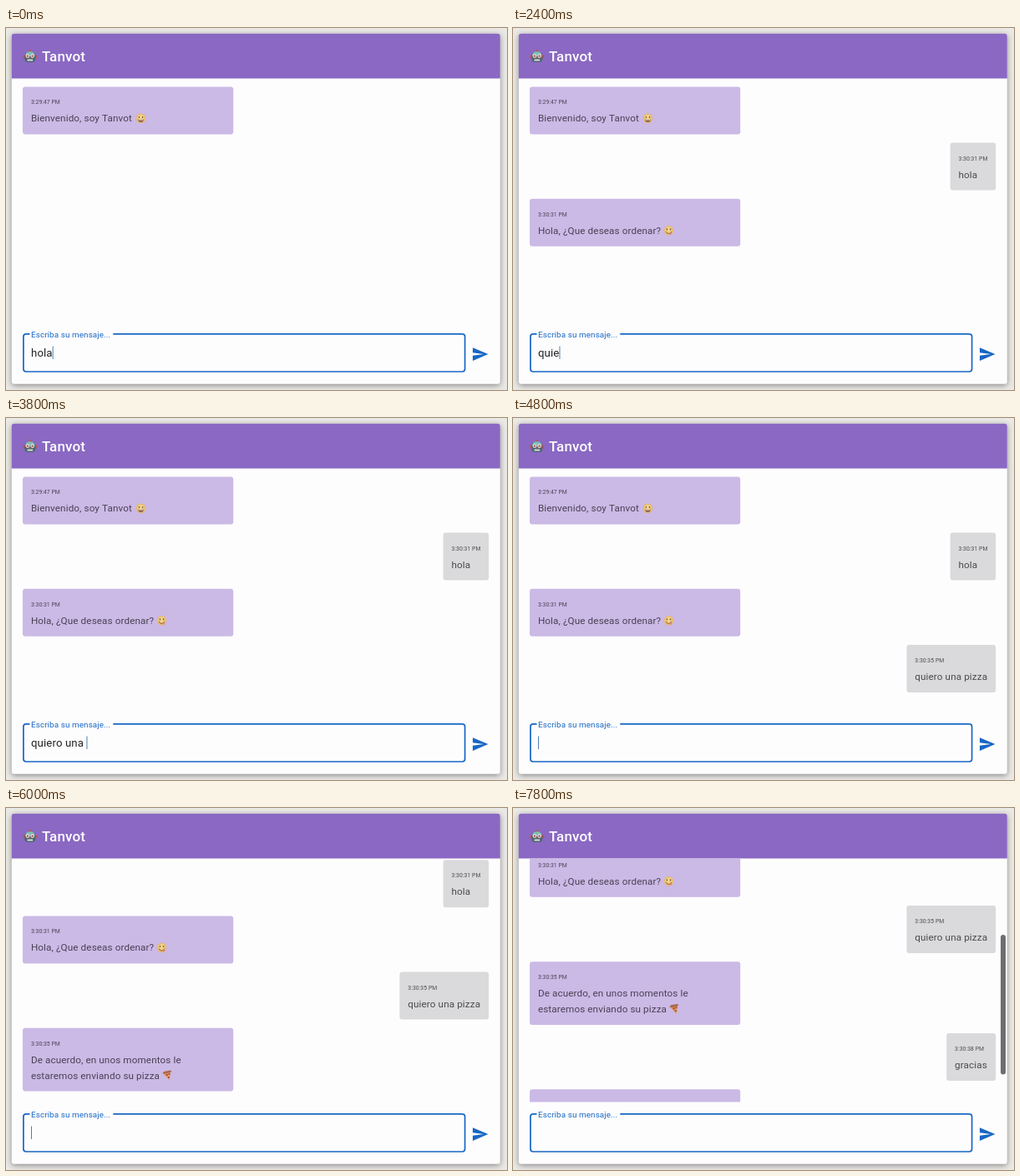
An HTML page with a canvas for the animation above (8000 ms loop, 600 by 434 pixels).

```html
<!DOCTYPE html>
<html lang="es">
<head>
<meta charset="utf-8">
<title>Chat</title>
<style>
  html, body { margin: 0; width: 100%; height: 100%; overflow: hidden; background: #ebe9e6; }
  canvas { display: block; width: 600px; height: 434px; }
</style>
</head>
<body>
<canvas id="stage"></canvas>
<script>
const W = 600, H = 434, LOOP = 8000, STEP = 200;
const BLUE = '#1767c4';
const BOT = 'Tanvot';
const SEND = new Path2D('M2.01 21L23 12 2.01 3 2 10l15 2-15 2z');

const canvas = document.getElementById('stage');
const ratio = window.devicePixelRatio || 1;
canvas.width = W * ratio;
canvas.height = H * ratio;
const ctx = canvas.getContext('2d');

const messages = [
  { at: 0, y: 70.4, time: '3:29:47 PM', lines: [`Bienvenido, soy ${BOT}`], icon: smile, iconX: 161.5 },
  { at: 400, y: 137.6, time: '3:30:31 PM', lines: ['hola'], width: 54.6 },
  { at: 600, y: 204.8, time: '3:30:31 PM', lines: ['Hola, ¿Que deseas ordenar?'], icon: yum, iconX: 186.5 },
  { at: 4800, y: 272, time: '3:30:35 PM', lines: ['quiero una pizza'], width: 106.8 },
  { at: 5000, y: 339.2, time: '3:30:35 PM',
    lines: ['De acuerdo, en unos momentos le', 'estaremos enviando su pizza'], icon: pizza, iconX: 193.5 },
  { at: 7800, y: 425, time: '3:30:38 PM', lines: ['gracias'], width: 59 },
  { at: 7800, y: 492.2, time: '3:30:38 PM', lines: [''] }
];

// One letter per step from start until the message is sent.
const typing = [
  { text: 'hola', start: -600, sent: 400 },
  { text: 'quiero una pizza', start: 1800, sent: 4800 },
  { text: 'gracias', start: 6200, sent: 7800 }
];

function text(str, x, y, size, color, weight = 400, spacing = 0.00938) {
  ctx.font = `${weight} ${size}px Roboto, sans-serif`;
  ctx.letterSpacing = `${size * spacing}px`;
  ctx.fillStyle = color;
  ctx.fillText(str, x, y);
  return ctx.measureText(str).width;
}

function box(x, y, w, h, r, color) {
  ctx.fillStyle = color;
  ctx.beginPath();
  ctx.roundRect(x, y, w, h, r);
  ctx.fill();
}

function dot(x, y, rx, color, ry = rx) {
  ctx.fillStyle = color;
  ctx.beginPath();
  ctx.ellipse(x, y, rx, ry, 0, 0, Math.PI * 2);
  ctx.fill();
}

function shape(points, color) {
  ctx.fillStyle = color;
  ctx.beginPath();
  points.forEach(([x, y]) => ctx.lineTo(x, y));
  ctx.fill();
}

function face() {
  const glow = ctx.createRadialGradient(0, -1.5, 1, 0, 0, 6);
  glow.addColorStop(0, '#f6dc8c');
  glow.addColorStop(1, '#e3b36a');
  dot(0, 0, 5.8, glow);
  dot(-2, -1.4, 0.8, '#7a5643', 1.1);
  dot(2, -1.4, 0.8, '#7a5643', 1.1);
}

function smile() {
  face();
  ctx.fillStyle = '#8a5d4c';
  ctx.beginPath();
  ctx.arc(0, 1, 3.4, 0, Math.PI);
  ctx.fill();
  box(-3, 1, 6, 1.1, 0.4, '#f3eadd');
}

function yum() {
  face();
  ctx.strokeStyle = '#84583f';
  ctx.lineWidth = 0.9;
  ctx.beginPath();
  ctx.arc(0, 0.5, 3.2, 0.2, Math.PI - 0.2);
  ctx.stroke();
  dot(2.2, 3.5, 1.3, '#d9807d');
}

function pizza() {
  shape([[-6, -2.6], [3.6, -5.4], [2.2, 6]], '#dfa866');
  shape([[-6, -2.6], [-4.4, -4.6], [3.2, -6], [5, -4.6], [3.4, -3.4], [-4, -1.4]], '#a9694f');
  dot(-0.8, -0.4, 1.4, '#b8503f');
  dot(2, -1.6, 1.2, '#b8503f');
  dot(1.4, 2.4, 1.2, '#b8503f');
}

function robot() {
  dot(0, -6.6, 1.3, '#c3564d');
  dot(-7, 1, 1.3, '#b5544f', 2.4);
  dot(7, 1, 1.3, '#b5544f', 2.4);
  box(-6.4, -5.6, 12.8, 13, [6, 6, 4, 4], '#4d6670');
  box(-5.6, -5.4, 11.2, 5.6, [5, 5, 1, 1], '#82bdb9');
  for (const x of [-2.9, 2.9]) {
    dot(x, 0, 2.3, '#e8e5e2');
    dot(x, 0, 1.2, '#a44f4b');
  }
  shape([[0, 0.8], [1.1, 2.8], [-1.1, 2.8]], '#c3564d');
  box(-3.4, 4, 6.8, 2, 0.6, '#d7dcda');
}

function place(draw, x, y) {
  ctx.save();
  ctx.translate(x, y);
  draw();
  ctx.restore();
}

function bubble(msg) {
  const mine = msg.width !== undefined;
  const w = msg.width || 252.2;
  const x = mine ? 578.2 - w : 20;
  const h = 57 + (msg.lines.length - 1) * 18.7;
  const ink = mine ? '#4b4a4d' : '#4b4154';
  box(x, msg.y, w, h, 3, mine ? '#dad9db' : '#cbb9e6');
  text(msg.time, x + 9.9, msg.y + 21, 6.8, ink);
  msg.lines.forEach((line, i) => text(line, x + 9.9, msg.y + 42 + i * 18.7, 11.7, ink));
  if (msg.icon) place(msg.icon, msg.iconX, msg.y + h - 19);
}

function scrollbar(t) {
  if (t >= 7800) box(584, 152, 6, 167.5, 3, '#706d71');
  else if (t >= 5000) {
    ctx.globalAlpha = Math.max(0, Math.min(1, (5750 - t) / 250));
    box(584, 122.5, 6, 228.5, 3, '#706d71');
    ctx.globalAlpha = 1;
  }
}

function caretVisible(t, entry) {
  if (!entry) return true;
  const lastKey = entry.start + (entry.text.length - 1) * STEP;
  if (t <= lastKey) return true;
  return Math.floor((t - lastKey + 100) / 500) % 2 === 0;
}

function inputField(t) {
  const entry = typing.filter(e => t >= e.start).pop();
  const count = t < entry.sent ? Math.floor((t - entry.start) / STEP) + 1 : 0;

  ctx.strokeStyle = BLUE;
  ctx.lineWidth = 1.7;
  ctx.beginPath();
  ctx.moveTo(128.3, 366.9);
  ctx.lineTo(546.5, 366.9);
  ctx.arcTo(549.6, 366.9, 549.6, 370, 3.2);
  ctx.arcTo(549.6, 412, 546, 412, 3.2);
  ctx.arcTo(20.9, 412, 20.9, 408, 3.2);
  ctx.arcTo(20.9, 366.9, 24, 366.9, 3.2);
  ctx.lineTo(28.5, 366.9);
  ctx.stroke();

  text('Escriba su mensaje...', 30, 370.6, 9.9, BLUE);
  const width = text(entry.text.slice(0, count), 30, 394, 13.2, '#222124');
  if (caretVisible(t, entry)) {
    ctx.fillStyle = '#4c7fae';
    ctx.fillRect(30 + width, 381.5, 1, 15.5);
  }

  ctx.save();
  ctx.translate(557.2, 380.5);
  ctx.scale(0.88, 0.88);
  ctx.fillStyle = BLUE;
  ctx.fill(SEND);
  ctx.restore();
}

function card() {
  ctx.fillStyle = '#ebe9e6';
  ctx.fillRect(0, 0, W, H);
  ctx.save();
  ctx.shadowColor = 'rgba(0,0,0,.42)';
  ctx.shadowBlur = 7 * ratio;
  ctx.shadowOffsetY = 1.8 * ratio;
  box(6.8, 6.8, 585, 420, 3, '#fefdfe');
  ctx.restore();
  box(6.8, 6.8, 585, 53.6, [3, 3, 0, 0], '#8a68c3');
  place(robot, 28.8, 33.6);
  text(BOT, 43, 39.6, 17, '#fff', 500, 0.0075);
}

function draw(t) {
  ctx.setTransform(ratio, 0, 0, ratio, 0, 0);
  card();
  ctx.save();
  ctx.beginPath();
  ctx.rect(7, 60.4, 585, 292);
  ctx.clip();
  ctx.translate(0, t >= 7800 ? -155 : t >= 5000 ? -75.4 : 0);
  messages.filter(m => t >= m.at).forEach(bubble);
  ctx.restore();
  scrollbar(t);
  inputField(t);
}

function tick() {
  const t = performance.now() % LOOP;
  draw(Math.floor(t / STEP) * STEP);
  requestAnimationFrame(tick);
}
tick();
</script>
</body>
</html>
```
